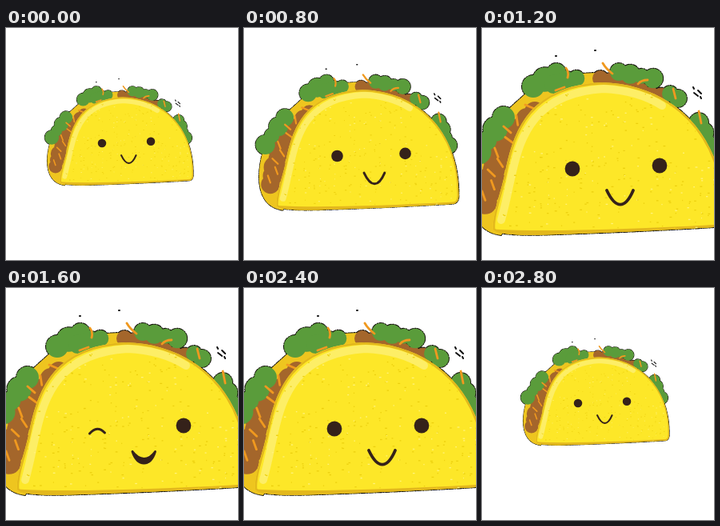
These frames come from a looping animation (290x290 px, 3 s). An HTML page with a canvas:

```html
<!DOCTYPE html>
<html lang="en">
<head>
<meta charset="utf-8">
<title>Winking taco</title>
<style>
  html, body { margin: 0; width: 100%; height: 100%; overflow: hidden; background: #fff; }
  canvas { display: block; width: 290px; height: 290px; }
</style>
</head>
<body>
<canvas id="stage" width="290" height="290"></canvas>
<script>
const ctx = document.getElementById('stage').getContext('2d');
const LOOP = 3000, BEAT = 200;
const INK = '#35221a', GREEN = '#5a9c3b', BEEF = '#a4662b', CARROT = '#f0991f';
const YELLOW = '#fde728', PALE = '#fdee66', GOLD = '#e3b81c';

let seed = 7;
const random = () => (seed = seed * 16807 % 2147483647) / 2147483647;
const clamp = value => Math.max(0, Math.min(1, value));

// Bumpy row of overlapping circles between two points
function clump(x1, y1, x2, y2, radius, count) {
  const path = new Path2D();
  for (let i = 0; i < count; i++) {
    const t = i / (count - 1), r = radius * (1 + .14 * Math.sin(2.4 * i));
    const x = x1 + (x2 - x1) * t, y = y1 + (y2 - y1) * t;
    path.moveTo(x + r, y);
    path.arc(x, y, r, 0, 2 * Math.PI);
  }
  return path;
}

const backShell = new Path2D(`M24 259 C0 256 -14 238 -14 205 C-12 145 20 112 48 88
  C70 66 110 55 150 56 C180 100 60 200 24 259 Z`);
const shell = new Path2D(`M14 252 C12 235 24 205 29 180 C39 130 58 72 150 68
  C235 70 304 130 303 236 Q303 249 292 249 Q190 255 95 258 Q20 261 14 252 Z`);
const sheen = new Path2D('M24 240 C31 215 33 200 38 180 C48 135 66 81 152 76 Q195 78 225 97');
const base = new Path2D('M14 255 Q100 260 300 249');

const beefs = [
  clump(66, 105, 28, 142, 13, 5),
  clump(22, 150, 4, 218, 16, 6),
  clump(148, 63, 224, 86, 10, 7)
];
const lettuces = [
  clump(27, 112, -4, 155, 14, 4),
  clump(64, 73, 93, 56, 14, 3),
  clump(90, 70, 118, 63, 12, 3),
  clump(171, 55, 214, 63, 11, 4),
  clump(235, 82, 245, 88, 10, 2),
  clump(271, 118, 287, 156, 12, 4)
];

// Shreds on top, then more scattered down the left side
const carrots = new Path2D(`M105 50 Q109 55 107 62 M92 78 L103 74 M151 44 Q155 51 163 57
  M195 70 Q199 65 207 65 M239 76 L242 88 M271 104 L274 119`);
for (let i = 0; i < 9; i++) {
  const x = 54 - 54 * Math.sqrt(i / 8) + 8 * (i % 2), y = 96 + 13.5 * i, angle = .4 + 1.1 * random();
  carrots.moveTo(x, y);
  carrots.lineTo(x + 12 * Math.cos(angle), y + 12 * Math.sin(angle));
}

const sparks = new Path2D('M141 28 h1 M92 35 h1 M264 74 l1 2 M265 81 l5 4 M270 78 l4 4 M273 86 l1 2');

const specks = Array.from({ length: 330 }, () => ({
  x: 24 + 8 * Math.floor(34 * random()) + 3 * random(), y: 82 + 168 * random(),
  w: 1 + 2 * random(), tone: random() < .7 ? '#ecd00f' : '#fff27a'
}));

function fill(path, color) {
  ctx.fillStyle = color;
  ctx.fill(path);
}

function line(path, color, width) {
  ctx.strokeStyle = color;
  ctx.lineWidth = width;
  ctx.stroke(path);
}

function drawBody() {
  ctx.setLineDash([5, 2, 1, 2]);
  [backShell, ...beefs, ...lettuces, shell].forEach(piece => line(piece, '#15130c', 2));
  ctx.setLineDash([]);

  fill(backShell, '#eec51f');
  beefs.forEach(beef => fill(beef, BEEF));
  lettuces.forEach(leaf => fill(leaf, GREEN));
  line(carrots, CARROT, 2.8);
  fill(shell, YELLOW);

  ctx.save();
  ctx.clip(shell);
  line(sheen, PALE, 10);
  line(shell, GOLD, 5);
  line(base, GOLD, 7);
  for (const { x, y, w, tone } of specks) {
    ctx.fillStyle = tone;
    ctx.fillRect(x, y, w, 1.3);
  }
  ctx.restore();
  line(sparks, '#111', 2);
}

// Blends from a thin smile to an open grin
function drawMouth(open) {
  const mix = (a, b) => a + (b - a) * open;
  const left = [mix(156, 160), mix(203, 206)], right = [mix(189, 184), mix(203, 206)];
  const low = mix(226.5, 221);
  const lip = mix(low, 209);
  const mouth = new Path2D();
  mouth.moveTo(...left);
  mouth.bezierCurveTo(mix(167, 162), low, mix(179, 182), low, ...right);
  mouth.bezierCurveTo(mix(179, 177), lip, 167, lip, ...left);
  fill(mouth, INK);
  line(mouth, INK, mix(3.8, 2));
}

function drawEye(x, y) {
  const eye = new Path2D();
  eye.arc(x, y, 9.4, 0, 2 * Math.PI);
  fill(eye, INK);
}

function drawFace(beat) {
  const shut = beat >= 6 && beat <= 8;
  if (shut) line(new Path2D('M104.5 182 Q114 171 123.5 181'), INK, 3);
  else drawEye(113, 176);
  if (shut && beat > 6) line(new Path2D('M104 167 l3 5 M112.5 163 l.5 8 M123 167 l-3 5'), INK, 1.5);
  drawEye(222, 172);
  drawMouth(clamp(Math.min((beat - 4) / 4, 9.3 - beat)));
}

function draw(time) {
  // The first pose holds for three beats
  const beat = Math.max(0, Math.floor(time / BEAT) - 2);
  const step = Math.max(0, 4 - beat, 2 * (beat - 10));
  const size = 1 - .106 * step, faceSize = 1 - .11 * step;
  ctx.setTransform(1, 0, 0, 1, 0, 0);
  ctx.fillStyle = '#fff';
  ctx.fillRect(0, 0, 290, 290);
  ctx.lineCap = ctx.lineJoin = 'round';

  ctx.setTransform(size, 0, 0, size, 140.5 * (1 - size), 27 + 9 * step - 27 * size);
  drawBody();
  // The face is anchored at its left eye
  ctx.setTransform(faceSize, 0, 0, faceSize,
    113 + 1.75 * step - 113 * faceSize, 176 - 8 * step - 176 * faceSize);
  drawFace(beat);
}

const begin = performance.now();
function tick() {
  draw((performance.now() - begin) % LOOP);
  requestAnimationFrame(tick);
}
tick();
</script>
</body>
</html>
```
